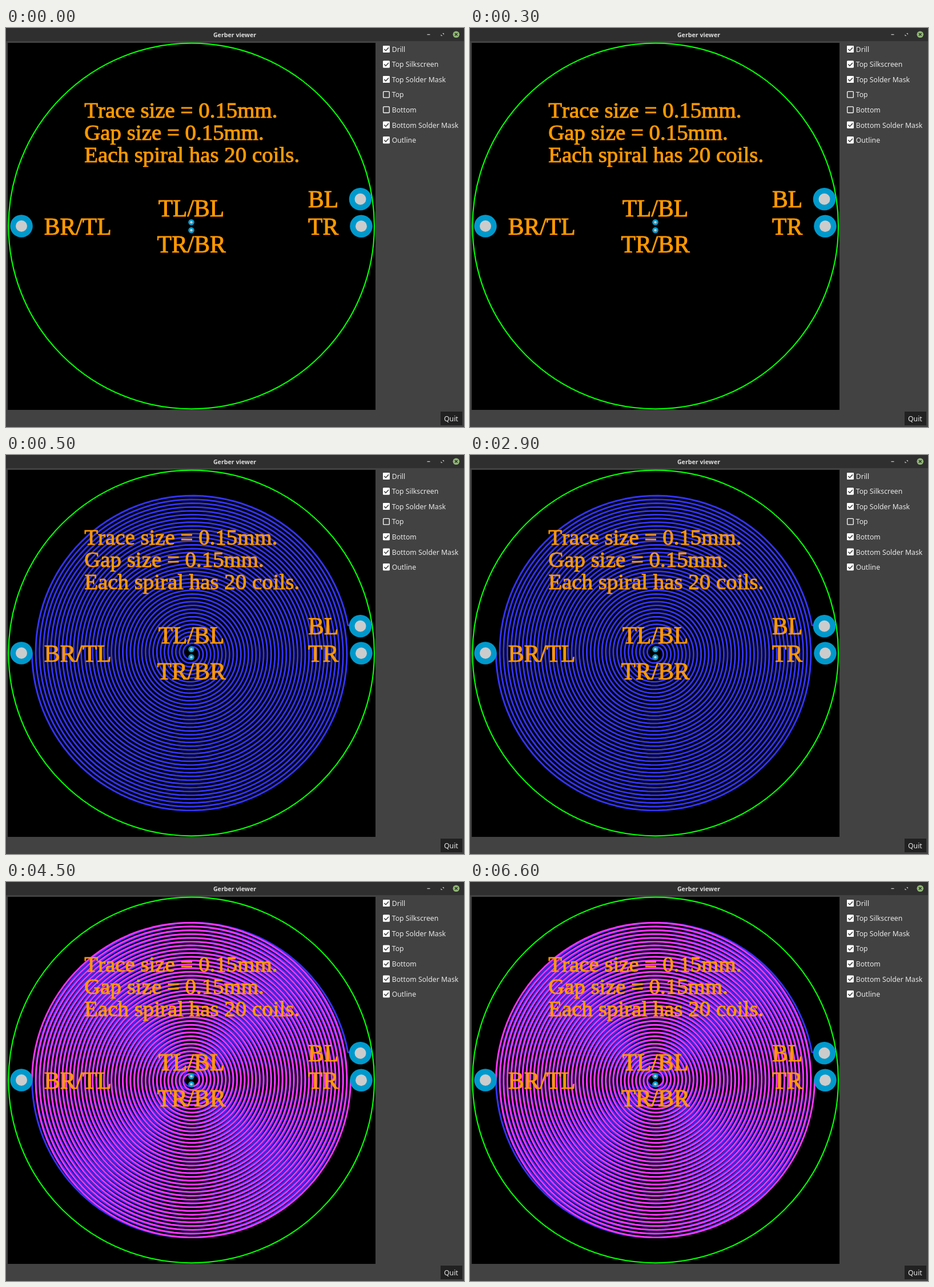
Animation of 802x699 px, one loop 8000 ms. Source, as an HTML page:

```html
<!DOCTYPE html>
<html lang="en">
<head>
<meta charset="utf-8">
<title>Gerber viewer</title>
<style>
  html, body { margin: 0; width: 100%; height: 100%; overflow: hidden; background: #424242; }
  svg { display: block; width: 802px; height: 699px; }
  .ui { font: 12.25px "Noto Sans", "Open Sans", sans-serif; fill: #e8e8e8; }
  .title { font: bold 10.67px "Noto Sans", "Open Sans", sans-serif; fill: #dcdcdc; text-anchor: middle; }
  .silk { font-family: "Liberation Serif", "Times New Roman", serif; font-kerning: none;
          fill: #ff9900; stroke: #ff9900; stroke-width: 1; }
  .note { font-size: 38.9px; }
  .label { font-size: 41.6px; }
  .trace { fill: none; stroke-linejoin: round; stroke-linecap: round; }
</style>
</head>
<body>
<svg id="stage" viewBox="0 0 802 699">
  <rect width="802" height="699" fill="#424242"/>
  <rect width="802" height="23" fill="#2f2f2f"/>
  <text class="title" x="400.5" y="16">Gerber viewer</text>
  <path d="M737.5 11.5h5" stroke="#c8c8c8" stroke-width="1.3"/>
  <path d="M764 9h3v3zM761.5 11v3h3z" fill="#b5b5b5"/>
  <circle cx="788.3" cy="11.3" r="5.8" fill="#91b876"/>
  <path d="M786 9l4.600 4.600m0-4.600l-4.600 4.600" stroke="#2f2f2f" stroke-width="1.4"/>
  <rect x="3" y="26" width="644" height="643" fill="#000"/>
  <g id="bottom" class="trace" stroke="#3333ff"></g>
  <g id="top" class="trace" stroke="#ff33ff"></g>
  <circle cx="324.7" cy="347" r="320.3" fill="none" stroke="#00ff00" stroke-width="2.2"/>
  <g id="pads"></g>
  <g id="silk" class="silk"></g>
  <g id="panel" class="ui"></g>
  <rect x="761" y="672" width="38" height="24" fill="#212121"/>
  <text class="ui" x="767" y="689">Quit</text>
</svg>
<script>
const LOOP = 8000, BOTTOM_ON = 500, TOP_ON = 4500;
const CX = 324.5, CY = 347;
const PX_PER_MM = 19.885, TRACE = 0.15, GAP = 0.15;
const byId = id => document.getElementById(id);

function add(parent, tag, attrs, text) {
  const el = document.createElementNS("http://www.w3.org/2000/svg", tag);
  for (const key in attrs) el.setAttribute(key, attrs[key]);
  if (text) el.textContent = text;
  parent.appendChild(el);
  return el;
}

// Archimedean arm, angles in turns; side flips both axes, mirror flips it vertically.
function arm(side, mirror, endTurn) {
  const points = [];
  const startTurn = 0.75, steps = 2400;
  for (let i = 0; i <= steps; i++) {
    const angle = 2 * Math.PI * (startTurn + (endTurn - startTurn) * i / steps);
    const r = PX_PER_MM * (angle + TRACE + GAP) / (3 * Math.PI);
    const x = CX + side * r * Math.cos(angle);
    const y = CY + side * mirror * r * Math.sin(angle);
    points.push(x.toFixed(2) + " " + y.toFixed(2));
  }
  return "M" + points.join("L");
}

const traces = [
  ["bottom", arm(1, 1, 20.972) + "L620.5 300"],
  ["bottom", arm(-1, 1, 21)],
  ["top", arm(1, -1, 21)],
  ["top", arm(-1, -1, 21)]
];
for (const [layer, d] of traces) add(byId(layer), "path", { d, "stroke-width": TRACE * PX_PER_MM });

const pads = [
  [27, 347, 19.8, 10], [620.5, 299.8, 19.8, 10], [622, 347.2, 19.8, 10],
  [324.5, 340.2, 5.3, 2.3], [324.5, 354.2, 5.3, 2.3]
];
for (const [cx, cy, r, hole] of pads) {
  add(byId("pads"), "circle", { cx, cy, r, fill: "#0099cc" });
  add(byId("pads"), "circle", { cx, cy, r: hole, fill: "#cccccc" });
}

const silk = [
  ["note", 137.2, 156.5, "Trace size = 0.15mm."],
  ["note", 137.2, 196, "Gap size = 0.15mm."],
  ["note", 137.2, 235.3, "Each spiral has 20 coils."],
  ["label", 66.7, 361.5, "BR/TL"],
  ["label", 266.7, 330, "TL/BL"],
  ["label", 264.5, 393, "TR/BR"],
  ["label", 528.9, 314, "BL"],
  ["label", 529, 361.5, "TR"]
];
for (const [kind, x, y, text] of silk) add(byId("silk"), "text", { class: kind, x, y }, text);

const layers = ["Drill", "Top Silkscreen", "Top Solder Mask", "Top", "Bottom", "Bottom Solder Mask", "Outline"];
const checks = {};
layers.forEach((name, i) => {
  const y = 37 + i * 26.55;
  const row = add(byId("panel"), "g", {});
  add(row, "rect", { x: 660.7, y: y - 5.3, width: 10.6, height: 10.6, rx: 1, fill: "none", stroke: "#fff", "stroke-width": 1.3 });
  const check = checks[name] = add(row, "g", {});
  add(check, "rect", { x: 660, y: y - 6, width: 12, height: 12, rx: 1.3, fill: "#fff" });
  add(check, "path", { d: `M662.3 ${y}l2.7 2.7l5-5.3`, fill: "none", stroke: "#424242", "stroke-width": 1.6 });
  add(row, "text", { x: 675.7, y: y + 4.8 }, name);
});

function show(el, on) { el.style.visibility = on ? "visible" : "hidden"; }

const start = performance.now();
function draw(now) {
  const t = Math.max(0, now - start) % LOOP;
  for (const [id, name, from] of [["bottom", "Bottom", BOTTOM_ON], ["top", "Top", TOP_ON]]) {
    show(byId(id), t >= from);
    show(checks[name], t >= from);
  }
  requestAnimationFrame(draw);
}
draw(start);
</script>
</body>
</html>
```
